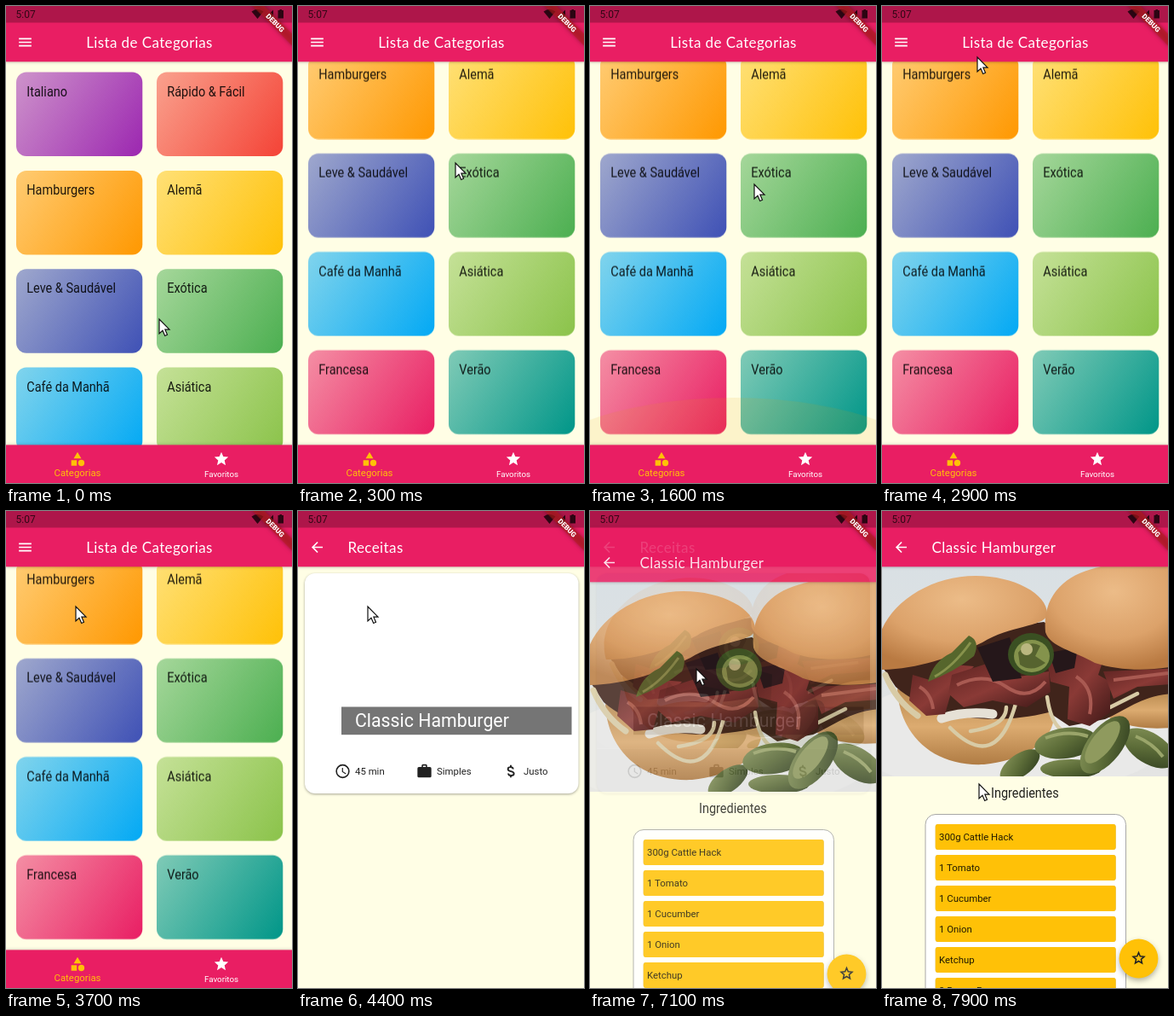
An HTML page that plays this animation: 336 by 559 pixels, repeating every 8000 ms.

```html
<!DOCTYPE html>
<html lang="pt">
<head>
<meta charset="utf-8">
<title>Receitas</title>
<style>
html, body { margin: 0; width: 100%; height: 100%; overflow: hidden; background: #fffee5; }
svg.stage { display: block; width: 336px; height: 559px; }
text { font-family: Roboto, sans-serif; font-size: 11.4px; fill: rgba(0,0,0,.87); }
.title { font-family: Lato, sans-serif; font-size: 17px; letter-spacing: .4px; fill: #fff; }
.cond { font-size: 16.1px; transform: scaleX(.9); }
.mid { text-anchor: middle; }
.bar { fill: #e91e63; filter: drop-shadow(0 1.5px 1.5px rgba(0,0,0,.2)); }
.paper { fill: #fffee5; }
.raised { filter: drop-shadow(0 1.5px 1.5px rgba(0,0,0,.35)); }
.flat { filter: drop-shadow(0 .7px .7px rgba(0,0,0,.25)); }
.dark { fill: rgba(0,0,0,.87); }
.white { fill: #fff; }
.amber { fill: #ffc107; }

/* 1.25% = one 100 ms step */
#list, #glow, #tapA, #tapB, #recipes, #detail, #cardPhoto, #cursor {
  animation: 8s step-end -2ms infinite;
}
#list { animation-name: scroll; }
#glow { animation-name: glow; transform-origin: 168px 514px; }
#tapA { animation-name: tapA; }
#tapB { animation-name: tapB; }
#recipes { animation-name: openRecipes; }
#detail { animation-name: openDetail; }
#cardPhoto { animation-name: photo; }
#cursor { animation-name: cursor; }

@keyframes scroll {
  0% { transform: translateY(0); }
  1.25% { transform: translateY(-20px); }
  2.5% { transform: translateY(-98px); }
  3.75%, 100% { transform: translateY(-135.4px); }
}
@keyframes glow {
  0% { opacity: 0; transform: scaleY(.1); }
  5% { opacity: .05; transform: scaleY(.3); animation-timing-function: steps(2); }
  7.5% { opacity: .08; transform: scaleY(.5); }
  10% { opacity: .06; transform: scaleY(.4); animation-timing-function: steps(3); }
  13.75% { opacity: 0; transform: scaleY(.1); }
  15% { opacity: .03; transform: scaleY(.4); animation-timing-function: steps(4); }
  20% { opacity: .12; transform: scaleY(1); }
  21.25% { opacity: .13; transform: scaleY(1.05); animation-timing-function: steps(7); }
  30%, 100% { opacity: 0; transform: scaleY(.1); }
}
@keyframes tapA {
  0% { opacity: 0; }
  50% { opacity: .2; }
  55%, 100% { opacity: 0; }
}
@keyframes tapB {
  0% { opacity: 0; }
  85% { opacity: .14; }
  90%, 100% { opacity: 0; }
}
@keyframes openRecipes {
  0% { opacity: 0; transform: translateY(140px); }
  53.75% { opacity: .6; transform: translateY(30px); }
  55%, 100% { opacity: 1; transform: none; }
}
@keyframes openDetail {
  0% { opacity: 0; transform: translateY(140px); }
  87.5% { opacity: .35; transform: translateY(70px); }
  88.75% { opacity: .85; transform: translateY(18px); }
  90%, 100% { opacity: 1; transform: none; }
}
@keyframes photo {
  0% { opacity: 0; }
  62.5%, 100% { opacity: 1; }
}
@keyframes cursor {
  0% { transform: translate(180px,367px); }
  1.25% { transform: translate(181px,335px); }
  2.5% { transform: translate(183px,250px); }
  3.75% { transform: translate(185px,184px); animation-timing-function: steps(3); }
  7.5% { transform: translate(189px,126px); }
  10% { transform: translate(190px,150px); animation-timing-function: steps(4); }
  15% { transform: translate(192px,290px); animation-timing-function: steps(4); }
  20% { transform: translate(193px,209px); }
  21.25% { transform: translate(194px,180px); }
  22.5% { transform: translate(196px,168px); animation-timing-function: steps(6); }
  30% { transform: translate(284px,253px); }
  36.25% { transform: translate(112px,60px); }
  38.75% { transform: translate(100px,98px); }
  40% { transform: translate(84px,137px); }
  42.5% { transform: translate(112px,122px); }
  43.75% { transform: translate(139px,100px); }
  45% { transform: translate(110px,92px); }
  46.25% { transform: translate(82px,112px); }
  68.75% { transform: translate(92px,122px); }
  70% { transform: translate(112px,146px); }
  71.25% { transform: translate(127px,162px); }
  78.75% { transform: translate(128px,174px); }
  80% { transform: translate(125px,185px); }
  92.5% { transform: translate(128px,190px); }
  97.5% { transform: translate(120px,268px); }
  98.75%, 100% { transform: translate(114px,320px); }
}
</style>
</head>
<body>
<svg class="stage" viewBox="0 0 336 559">
  <defs>
    <clipPath id="view"><rect y="65" width="336" height="449.5"/></clipPath>
    <clipPath id="tile"><rect x="12" y="57" width="148" height="98.5" rx="12"/></clipPath>
    <clipPath id="cardTop"><path d="M8 278V85a12 12 0 0 1 12-12H317a12 12 0 0 1 12 12V278z"/></clipPath>
    <linearGradient id="wall" x2="0" y2="1"><stop stop-color="#d9e0e4"/><stop offset="1" stop-color="#e4e4e3"/></linearGradient>
    <radialGradient id="bun" cx=".5" cy=".25" r=".75"><stop stop-color="#ecbc88"/><stop offset=".6" stop-color="#dca26a"/><stop offset="1" stop-color="#b97a42"/></radialGradient>
    <linearGradient id="base" x2="0" y2="1"><stop stop-color="#b98a50"/><stop offset=".5" stop-color="#dcab70"/><stop offset="1" stop-color="#b07c44"/></linearGradient>
    <linearGradient id="meat" x2="1" y2="1"><stop stop-color="#5e2422"/><stop offset=".5" stop-color="#8a3a36"/><stop offset="1" stop-color="#3e1817"/></linearGradient>
    <linearGradient id="pickle" x2="1" y2="1"><stop stop-color="#87955a"/><stop offset=".5" stop-color="#5c6c38"/><stop offset="1" stop-color="#2f3d1e"/></linearGradient>

    <symbol id="menu" viewBox="0 0 24 24"><path d="M3 18h18v-2H3zm0-5h18v-2H3zm0-7v2h18V6z"/></symbol>
    <symbol id="back" viewBox="0 0 24 24"><path d="M20 11H7.83l5.59-5.59L12 4l-8 8 8 8 1.41-1.41L7.83 13H20z"/></symbol>
    <symbol id="shapes" viewBox="0 0 24 24"><path d="M12 2l-5.5 9h11zM3 13.5h8v8H3z"/><circle cx="17.5" cy="17.5" r="4.5"/></symbol>
    <symbol id="star" viewBox="0 0 24 24"><path d="M12 17.27L18.18 21l-1.64-7.03L22 9.24l-7.19-.61L12 2 9.19 8.63 2 9.24l5.46 4.73L5.82 21z"/></symbol>
    <symbol id="starLine" viewBox="0 0 24 24"><path d="M12 16.3L16.9 19.3 15.6 13.7 19.9 9.9 14.2 9.4 12 4.1 9.8 9.4 4.1 9.9 8.4 13.7 7.1 19.3z" fill="none" stroke="#222" stroke-width="1.9"/></symbol>
    <symbol id="clock" viewBox="0 0 24 24"><circle cx="12" cy="12" r="9" fill="none" stroke="#222" stroke-width="2"/><path d="M12.5 7H11v6l5.25 3.15.75-1.23-4.5-2.67z"/></symbol>
    <symbol id="work" viewBox="0 0 24 24"><path d="M20 6h-4V4a2 2 0 0 0-2-2h-4a2 2 0 0 0-2 2v2H4a2 2 0 0 0-2 2v11a2 2 0 0 0 2 2h16a2 2 0 0 0 2-2V8a2 2 0 0 0-2-2zm-6 0h-4V4h4z"/></symbol>
    <symbol id="money" viewBox="0 0 24 24"><path d="M15.4 9C15.300 7 14 6 11.800 6 9.500 6 7.900 7.100 7.900 8.800c0 4.500 8.600 2.300 8.600 6.500 0 1.900-1.700 2.900-4 2.900-2.500 0-4-1.200-4.100-3.200M12 3v3m0 12v3" fill="none" stroke="#222" stroke-width="2.3"/></symbol>

    <symbol id="burger" viewBox="0 0 369 246" preserveAspectRatio="xMidYMid slice">
      <rect width="369" height="246" fill="url(#wall)"/>
      <g transform="translate(16.5 -65)">
        <ellipse cx="150" cy="262" rx="190" ry="70" fill="#e9e9e8"/>
        <path d="M18 208C20 262 60 300 120 297 170 292 206 268 202 232 150 246 60 236 18 208z" fill="url(#base)"/>
        <path d="M262 238C290 218 330 212 353 212V252C320 258 280 254 262 238z" fill="url(#base)"/>
        <path d="M0 182C50 160 110 140 190 130L260 168 353 178V214C310 212 290 232 262 244L220 252 196 236C130 252 60 244 16 206z" fill="#40241b"/>
        <g fill="none" stroke="#d8cba6" stroke-linecap="round" stroke-width="7">
          <path d="M4 192Q16 222 42 240"/>
          <path d="M70 243Q98 234 130 238" stroke="#e6e1d6" stroke-width="11"/>
          <path d="M80 254Q134 308 157 226M104 258Q146 252 146 230M194 218Q198 246 210 256M268 230L300 214" stroke-width="4.5"/>
        </g>
        <g fill="url(#meat)">
          <path d="M36 192L56 198 84 180 108 182 82 210 74 238 52 240 32 222z"/>
          <path d="M82 192L126 178 150 196 196 188 198 212 170 230 130 222 96 230 78 214z"/>
          <path d="M194 176L220 162 258 180 254 192 268 200V236L244 252 218 244 220 206 198 200z"/>
          <path d="M260 188L353 184V202L300 206 272 220z"/>
        </g>
        <path d="M88 204Q120 188 146 206T192 200M228 194Q250 208 244 238M44 206Q58 214 60 232M272 198L336 190" fill="none" stroke="#a95a52" stroke-width="4"/>
        <path d="M112 160L150 148 164 196 130 200zM196 166L230 160 226 184 204 190z" fill="#25171a"/>
        <path d="M-4 186C-20 130 40 76 110 76 156 76 196 98 194 122 190 136 150 134 118 154 80 172 40 186-4 186z" fill="url(#bun)"/>
        <path d="M192 142C188 98 216 74 254 66L260 64H353V180C320 188 280 188 250 178 226 164 198 160 192 142z" fill="url(#bun)"/>
        <path d="M54 200Q60 176 82 166L102 146Q116 152 108 170 86 188 54 200z" fill="#56662c"/>
        <path d="M62 194Q84 182 104 154" fill="none" stroke="#87924c" stroke-width="3"/>
        <ellipse cx="175" cy="168" rx="27" ry="25" fill="#3a4f22"/>
        <ellipse cx="176" cy="170" rx="21" ry="19" fill="#84934c"/>
        <path d="M160 166Q172 150 186 158L180 170 192 178Q176 190 162 180z" fill="#56632f"/>
        <circle cx="170" cy="162" r="7" fill="#bab780"/>
        <g fill="url(#pickle)">
          <ellipse cx="162" cy="298" rx="27" ry="13" transform="rotate(-35 162 298)"/>
          <ellipse cx="314" cy="278" rx="34" ry="18" transform="rotate(32 314 278)"/>
          <ellipse cx="216" cy="272" rx="37" ry="18" transform="rotate(-8 216 272)"/>
          <ellipse cx="222" cy="302" rx="36" ry="11"/>
          <ellipse cx="262" cy="274" rx="40" ry="20" transform="rotate(-52 262 274)"/>
        </g>
        <ellipse cx="259" cy="271" rx="30" ry="12" transform="rotate(-52 259 271)" fill="#8f9a5e"/>
        <path d="M192 266Q218 256 242 264M298 264Q318 272 330 288" fill="none" stroke="#9aa56a" stroke-width="4"/>
      </g>
    </symbol>
  </defs>

  <g id="home">
    <rect class="paper" width="336" height="559"/>
    <g clip-path="url(#view)">
      <g id="list"></g>
      <g clip-path="url(#tile)"><circle id="tapA" cx="82" cy="112" r="48" fill="#e91e63"/></g>
      <ellipse id="glow" cx="168" cy="561" rx="252" ry="102" fill="#e0a000"/>
    </g>
    <rect class="bar" width="336" height="65.3"/>
    <use class="white" href="#menu" x="12.7" y="32.7" width="19.6" height="19.6"/>
    <text class="title mid" x="168.5" y="48.5">Lista de Categorias</text>
    <rect y="514.4" width="336" height="45" fill="#e91e63" style="filter:drop-shadow(0 -1px 1.5px rgba(0,0,0,.15))"/>
    <use class="amber" href="#shapes" x="74.2" y="521.2" width="19.6" height="19.6"/>
    <text class="mid" x="84" y="551" style="fill:#ffc107">Categorias</text>
    <use class="white" href="#star" x="243.2" y="521" width="19.6" height="19.6"/>
    <text class="mid" x="253" y="551.5" style="font-size:9.8px;fill:#fff">Favoritos</text>
  </g>

  <g id="recipes">
    <rect class="paper" width="336" height="559"/>
    <rect class="bar" width="336" height="65.3"/>
    <use class="white" href="#back" x="12.7" y="32.7" width="19.6" height="19.6"/>
    <text class="title" x="58.5" y="48.5">Receitas</text>
    <rect class="white raised" x="8" y="73" width="321.5" height="258" rx="12"/>
    <g id="cardPhoto" clip-path="url(#cardTop)"><use href="#burger" x="8" y="73" width="321.5" height="205.5"/></g>
    <path id="tapB" d="M8 278.5H329.5V319a12 12 0 0 1-12 12H20a12 12 0 0 1-12-12z"/>
    <rect x="51" y="229.5" width="270.5" height="32.7" fill="rgba(0,0,0,.54)"/>
    <text x="67" y="253.4" style="font-size:21.3px;fill:#fff">Classic Hamburger</text>
    <g class="dark">
      <use href="#clock" x="42.7" y="295.2" width="19.6" height="19.6"/>
      <use href="#work" x="138.7" y="295.2" width="19.6" height="19.6"/>
      <use href="#money" x="240.2" y="295.2" width="19.6" height="19.6"/>
    </g>
    <text x="67" y="309">45 min</text>
    <text x="163" y="309">Simples</text>
    <text x="265" y="309">Justo</text>
  </g>

  <g id="detail">
    <rect class="paper" width="336" height="559"/>
    <use href="#burger" y="65" width="336" height="246"/>
    <rect class="bar" width="336" height="65.3"/>
    <use class="white" href="#back" x="12.7" y="32.7" width="19.6" height="19.6"/>
    <text class="title" x="58.5" y="48.5">Classic Hamburger</text>
    <g transform="translate(128 335.5)"><text class="cond">Ingredientes</text></g>
    <rect x="51" y="355.5" width="235.5" height="245" rx="12" fill="#fff" stroke="#9e9e9e" stroke-width=".9"/>
    <g id="items"></g>
    <circle class="amber" cx="301.5" cy="524.5" r="22.9" style="filter:drop-shadow(0 3px 3px rgba(0,0,0,.3))"/>
    <use href="#starLine" x="291.7" y="514.2" width="19.6" height="19.6"/>
  </g>

  <g id="system">
    <rect width="336" height="19.5" opacity=".25"/>
    <text x="11.5" y="14.3" style="font-size:12px;fill:rgba(0,0,0,.72)">5:07</text>
    <path d="M288.5 6.5Q295.5 1 302.5 6.5L295.5 15zM304 14.5H314V4.5zM319.5 5h2V4h2.5v1h2V14.5h-6.500z" opacity=".75"/>
    <g transform="translate(336 0) rotate(45)">
      <rect x="-34" y="22.9" width="68" height="9.8" fill="#b71c1c" fill-opacity=".63" style="filter:drop-shadow(0 0 2.5px rgba(0,0,0,.5))"/>
      <text class="mid" y="30.8" style="font-size:8.3px;font-weight:900;fill:#fff">DEBUG</text>
    </g>
  </g>

  <path id="cursor" d="M0 0V17L4 13.3 6.7 19.5 9.5 18.3 6.9 12.2H12z" fill="#fff" stroke="#111" stroke-width="1.2"/>
</svg>
<script>
const categories = [
  ['Italiano', '#9c27b0'], ['Rápido &amp; Fácil', '#f44336'],
  ['Hamburgers', '#ff9800'], ['Alemã', '#ffc107'],
  ['Leve &amp; Saudável', '#3f51b5'], ['Exótica', '#4caf50'],
  ['Café da Manhã', '#03a9f4'], ['Asiática', '#8bc34a'],
  ['Francesa', '#e91e63'], ['Verão', '#009688']
];
const ingredients = ['300g Cattle Hack', '1 Tomato', '1 Cucumber', '1 Onion', 'Ketchup', '2 Bacon Pcs'];

const tile = ([name, color], i) => `
  <g transform="translate(${12 + i % 2 * 165} ${77.6 + (i >> 1) * 115.3})">
    <linearGradient id="tone${i}" gradientUnits="userSpaceOnUse" x2="148" y2="98.5">
      <stop stop-color="${color}" stop-opacity=".5"/><stop offset="1" stop-color="${color}"/>
    </linearGradient>
    <rect width="148.3" height="98.5" rx="12" fill="url(#tone${i})"/>
    <g transform="translate(12.3 28)"><text class="cond">${name}</text></g>
  </g>`;
const item = (name, i) => `
  <g transform="translate(62.7 ${367 + i * 36})">
    <rect class="amber flat" width="212" height="30" rx="3"/>
    <text x="4.3" y="19">${name}</text>
  </g>`;

document.getElementById('list').innerHTML = categories.map(tile).join('');
document.getElementById('items').innerHTML = ingredients.map(item).join('');
</script>
</body>
</html>
```
